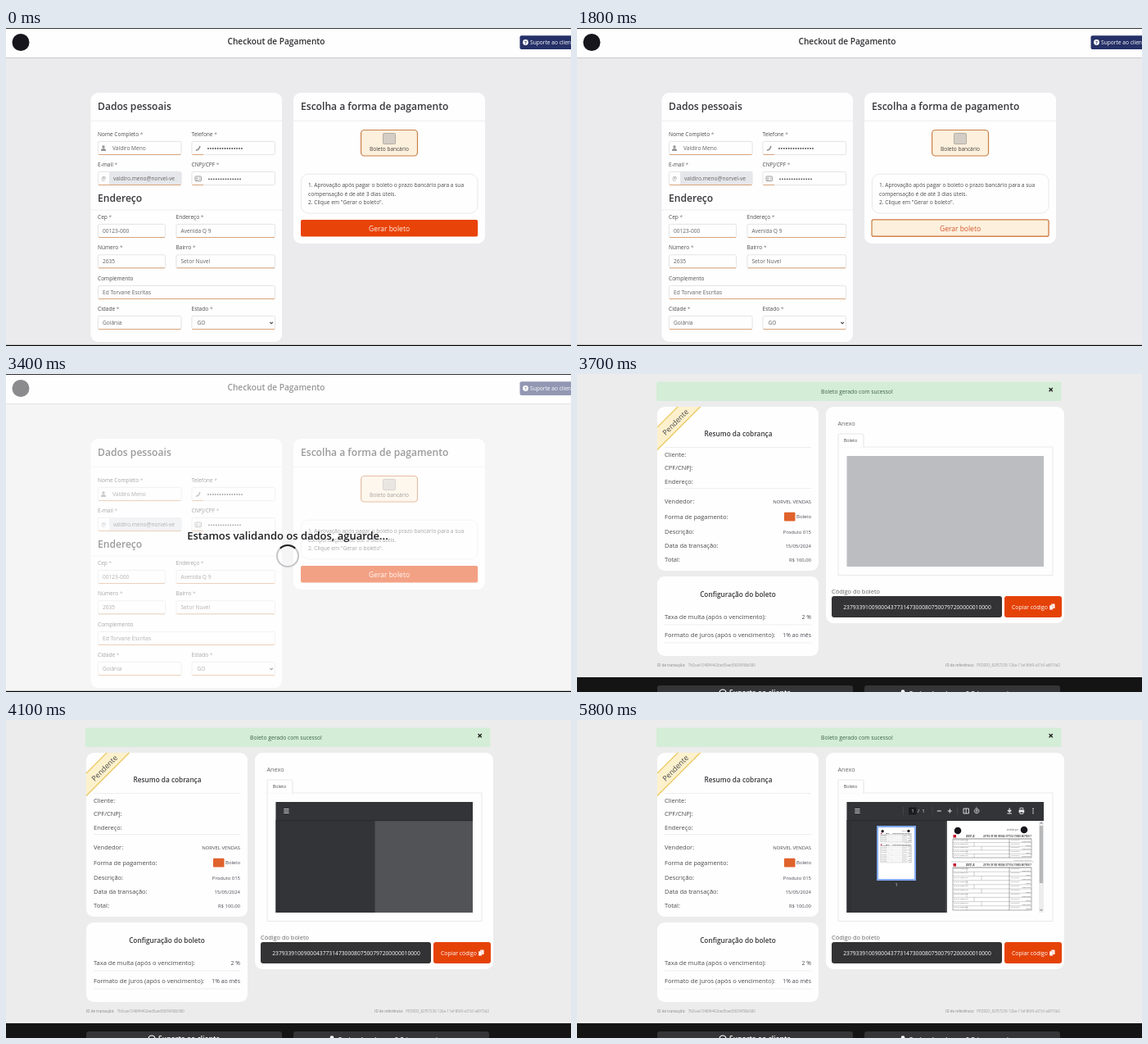
Recreate the animation shown at these times as an HTML page. Size 690x388 px, loop 6100 ms.

```html
<!DOCTYPE html>
<html lang="pt-BR">
<head>
<meta charset="utf-8">
<title>Checkout de Pagamento</title>
<style>
html, body { margin: 0; width: 100%; height: 100%; overflow: hidden; background: #ebebed; }
#stage { display: block; width: 100vw; height: 100vh; }
text { font-family: "Open Sans", "Noto Sans", sans-serif; white-space: pre; }
</style>
</head>
<body>
<svg id="stage" viewBox="0 0 690 388" preserveAspectRatio="none"></svg>
<script>
const LOOP = 6100;

// Drawing helpers return SVG markup
const rect = (x, y, x2, y2, fill, r = 0, more = '') =>
  `<rect x="${x}" y="${y}" width="${x2 - x}" height="${y2 - y}" rx="${r}" fill="${fill}" ${more}/>`;
const path = (d, color, width = 1, fill = 'none') =>
  `<path d="${d}" fill="${fill}" stroke="${color}" stroke-width="${width}"/>`;
const dot = (x, y, r, fill) => `<circle cx="${x}" cy="${y}" r="${r}" fill="${fill}"/>`;
const text = (x, y, s, size, fill = '#4b4b4f', anchor = 'start', weight = 400, more = '') =>
  `<text x="${x}" y="${y}" font-size="${size}" fill="${fill}" text-anchor="${anchor}" font-weight="${weight}" ${more}>${s}</text>`;
const rule = (x, y, x2, color = '#e9e9eb') => path(`M${x} ${y}H${x2}`, color, .8);
const group = (id, body) => `<g id="${id}">${body}</g>`;
const card = (x, y, x2, y2) => rect(x, y, x2, y2, '#fefefe', 9);
const heading = (x, y, s) => text(x, y, s, 12.1, '#37373c', 'start', 600);

function field(x, x2, y, label, value, inset = 6, lineEnd = x2 - 1) {
  const star = label === 'Complemento' ? '' : ' <tspan fill="#888">*</tspan>';
  return text(x, y - 6, label + star, 6.55) +
    rect(x + .4, y + .4, x2 - .4, y + 16.6, '#fefefe', 2, 'stroke="#dddde0" stroke-width=".8"') +
    (label === 'E-mail' ? rect(x + 14, y + .5, x2 - .5, y + 16.5, '#e6e7eb', 1) : '') +
    path(`M${x + 1} ${y + 16.5}H${lineEnd}`, '#d8a57c', 1) +
    text(x + inset, y + 11, value, 6.6, '#626267');
}

function secret(x, y, n) {
  let s = '';
  for (let i = 0; i < n; i++) s += dot(x + i * 2.92, y, .9, '#4a4a4a');
  return s;
}

function checkout() {
  const gray = '#949497';
  const icons =
    dot(119, 145, 1.7, gray) + path('M116 150v-1q0-2 3-2t3 2v1z', 'none', 0, gray) +
    path('M231.8 149.2q4.5-.6 5-5.4', gray, 1.6) +
    text(119.3, 186.2, '@', 6.6, gray, 'middle') +
    rect(231, 181, 238.4, 186.8, 'none', .8, `stroke="${gray}" stroke-width=".9"`) +
    dot(233.2, 183.4, .9, gray) + path('M232 185.6h2.5M235.4 183h2M235.4 185h2', gray, .7);

  return rect(0, 0, 690, 388, '#ebebed') +
    rect(0, 0, 690, 36, '#fefefe') + rect(0, 36, 690, 37, '#c8c8cc') +
    dot(18, 17.5, 10.5, '#16161c') +
    text(330, 20, 'Checkout de Pagamento', 10.15, '#2f2f33', 'middle', 600) +
    rect(627.5, 9.3, 700, 26, '#253067', 2) + dot(634.5, 17.5, 3.4, '#fff') +
    text(634.5, 19.7, '?', 6, '#253067', 'middle', 700) +
    text(640, 20, 'Suporte ao cliente', 6.63, '#fff') +
    card(103.5, 79, 337, 383) + card(351, 79, 585, 263) +
    heading(112, 100.3, 'Dados pessoais') + rule(104, 113.3, 337) +
    heading(112, 212.3, 'Endereço') + rule(104, 222, 337) +
    heading(360, 100.3, 'Escolha a forma de pagamento') + rule(351, 113.3, 585) +
    field(112, 214.5, 138, 'Nome Completo', 'Valdiro Meno', 18) +
    field(226.5, 329, 138, 'Telefone', '', 0, 241) + secret(247, 147, 15) +
    field(112, 214.5, 175, 'E-mail', 'valdiro.meno@norvel-ve', 19) +
    field(226.5, 329, 175, 'CNPJ/CPF', '', 0, 241) + secret(248, 184.3, 14) +
    field(112, 195, 239, 'Cep', '00123-000') +
    field(207.5, 329, 239, 'Endereço', 'Avenida Q 9') +
    field(112, 195, 276.3, 'Número', '2635') +
    field(207.5, 329, 276.3, 'Bairro', 'Setor Nuvel') +
    field(112, 329, 314, 'Complemento', 'Ed Torvane Escritas') +
    field(112, 214.5, 351, 'Cidade', 'Goiânia') +
    field(226.5, 329, 351, 'Estado', 'GO', 7) +
    path('M322.3 358.8l1.8 1.8 1.8-1.8', '#444', 1.1) + icons +
    rect(433.6, 124.5, 502.5, 156, '#fdf0dd', 4, 'stroke="#c98048" stroke-width="1.2"') +
    rect(460.5, 128.5, 475.5, 141.5, '#d3cdc5', 1, 'stroke="#a09a92" stroke-width=".7"') +
    text(468, 150, 'Boleto bancário', 6.5, '#45403c', 'middle') +
    rect(360.4, 178.2, 576, 226, '#fefefe', 9, 'stroke="#e4e4e6" stroke-width=".8"') +
    text(369, 194.3, '1. Aprovação após pagar o boleto o prazo bancário para a sua', 6.62) +
    text(369, 204.7, 'compensação é de até 3 dias úteis.', 6.62) +
    text(369, 215.2, '2. Clique em "Gerar o boleto".', 6.62) +
    rect(360, 234, 576.2, 254.5, '#e84308', 2) + text(468, 247.6, 'Gerar boleto', 8.5, '#fff3ea', 'middle') +
    group('hover',
      rect(360, 233.9, 576, 254.2, '#fdf0dd', 2, 'stroke="#cd7a42" stroke-width="1.2"') +
      text(468, 247.6, 'Gerar boleto', 8.5, '#d2552a', 'middle')) +
    group('wait',
      rect(0, 0, 690, 388, '#fff', 0, 'opacity=".5"') +
      text(344, 202, 'Estamos validando os dados, aguarde...', 12.97, '#1f1f23', 'middle', 600) +
      '<circle cx="344" cy="222" r="13" fill="none" stroke="#c6c6c9" stroke-width="2"/>' +
      group('arc', path('M334.8 212.8A13 13 0 0 1 353.2 212.8', '#222', 2))) +
    rect(0, 0, 690, .8, '#000') + rect(0, 386.8, 690, 388, '#000');
}

// One payment slip on the printed page
function slip(y, rows, step) {
  const end = y + 6 + rows * step;
  let s = rect(7.5, y + 1, 11, y + 4.5, '#c8102e') +
    text(23, y + 4.4, '237-2', 4, '#222', 'start', 700) +
    text(103, y + 4.4, '23793.39100 90004.377314 73000.807500 7', 2.9, '#222', 'end', 600) +
    path(`M7 ${y + 6}H103V${end}H7z M76 ${y + 6}V${end}`, '#555', .5);
  for (let i = 0; i < rows; i++) {
    const top = y + 6 + i * step;
    s += path(`M7 ${top}H103M${24 + i % 3 * 9} ${top}v${step}`, '#777', .35) +
      text(8, top + 2.2, 'Local de pagamento', 1.9, '#666') +
      text(78, top + 2.2, 'Vencimento', 1.9, '#666') +
      text(102, top + step - .7, i % 2 ? '100,00' : '15/05/2024', 2.1, '#333', 'end');
  }
  return s;
}

const sheet = () => rect(0, 0, 112, 160, '#fff') +
  dot(13, 12, 4.3, '#16161c') + dot(94, 11, 4.3, '#16161c') +
  text(87, 12, 'emitido por', 2.6, '#555', 'end') +
  slip(16, 5, 4.6) + text(103, 48.5, 'Autenticação mecânica', 2, '#666', 'end') +
  path('M5 50H106', '#888', .4) + slip(51, 10, 5.2);

function viewer() {
  const ink = '#e9e9ea';
  const tools = rect(405, 106.5, 414.5, 115.5, '#191b1c') +
    text(410, 113.2, '1', 6, ink, 'middle') + text(416, 113.2, '/  1', 6, ink) +
    path('M439.8 111h5M452.8 111h5M455.3 108.5v5', ink) +
    path('M398.5 106v10M434 106v10M464.5 106v10', '#4d5154', .6) +
    path('M472 108h6.4v6h-6.4zM475.2 108v6', ink, .9) +
    path('M486 109.2a2.8 2.8 0 1 0 2-1M488.4 106.5l-1.8 1.7 1.8 1.7M486.8 111l1.4-1.4 1.4 1.4-1.4 1.4z', ink, .8) +
    path('M528.2 107.5v4.5M526 110l2.2 2.2 2.2-2.2M525.5 114h5.4', ink, 1.2) +
    rect(539.6, 109.4, 546.2, 113, ink, .5) +
    path('M541 109v-1.7h3.8v1.7M541 112h3.8v2.5h-3.8z', ink, .8, '#323639') +
    dot(557, 108.4, .8, ink) + dot(557, 111, .8, ink) + dot(557, 113.6, .8, ink);
  return group('blank', rect(329.5, 100, 570, 235, '#bcbdc1')) +
    group('pdf',
      rect(329.5, 100, 570, 235, '#323438') + rect(450.5, 122.5, 570, 235, '#525357') +
      rect(329.5, 122, 570, 123.2, '#292b2e') + rect(329.5, 123, 335, 235, '#2e3034') +
      path('M339.3 108.7h6.2M339.3 111h6.2M339.3 113.3h6.2', ink, .9) +
      group('tools', tools) +
      group('page',
        `<svg x="452" y="123" width="112" height="112" viewBox="0 0 112 112">${sheet()}</svg>` +
        rect(564, 123, 570, 235, '#ededee') + rect(564.8, 129, 569.2, 199, '#b7b8ba') +
        path('M565.6 126.6l1.4-1.6 1.4 1.6M565.6 231l1.4 1.6 1.4-1.6', '#555', .8)) +
      group('thumb',
        rect(366, 129, 414, 196, '#83a9f2') +
        `<svg x="368" y="131" width="44" height="63" viewBox="0 0 112 160">${sheet()}</svg>` +
        text(390, 203.2, '1', 5.4, ink, 'middle')));
}

function receipt() {
  const rows = [
    ['Cliente:', 100.8], ['CPF/CNPJ:', 117.3], ['Endereço:', 134],
    ['Vendedor:', 158, 'NORVEL VENDAS'], ['Forma de pagamento:', 176.6, 'Boleto'],
    ['Descrição:', 195.2, 'Produto 015'], ['Data da transação:', 212, '15/05/2024'],
    ['Total:', 228.8, 'R$ 100,00'],
    ['Taxa de multa (após o vencimento):', 299.3, '2 %', 6.9],
    ['Formato de juros (após o vencimento):', 321.3, '1% ao mês', 6.9]
  ].map(([label, y, value = '', size = 5.95]) =>
    text(107, y, label, 7.52) + text(286, y - .3, value, size, '#4a4a54', 'end')).join('');

  return rect(0, 0, 690, 388, '#ececec') +
    rect(97, 9.5, 591.5, 33, '#d3edd7', 2) +
    text(342, 24, 'Boleto gerado com sucesso!', 6.74, '#3d5f48', 'middle') +
    path('M576.6 17l4.2 4.2M580.8 17l-4.2 4.2', '#222', 1.4) +
    card(98, 40, 295, 240) + card(98, 247, 295, 344) + card(304, 40, 595, 304) +
    path('M98 65L123 40H151L98 93z', 'none', 0, '#fdf1cd') +
    path('M98 65L123 40M98 92.5L150.5 40', '#ecc65e', 1.1) +
    text(0, 0, 'Pendente', 9, '#4a4a4a', 'middle', 400, 'transform="translate(122.5 61) rotate(-45)"') +
    text(197, 76.3, 'Resumo da cobrança', 8.25, '#38383c', 'middle', 600) +
    text(196.5, 272, 'Configuração do boleto', 8.25, '#38383c', 'middle', 600) +
    [89.5, 139.5, 306, 328].map(y => rule(107, y, 286)).join('') + rows +
    rect(253, 168.8, 266.5, 179.5, '#e0622c', 1) +
    text(318.5, 62.5, 'Anexo', 7.3, '#666') +
    rect(319, 89, 581, 245.5, 'none', 0, 'stroke="#e3e3e5" stroke-width=".8"') +
    path('M319 89.4V74.5q0-1.5 1.5-1.5H348.5q1.5 0 1.5 1.5V89.4', '#e0e0e2', .8, '#fefefe') +
    text(334, 82.8, 'Boleto', 5.4, '#4b4b4f', 'middle') + viewer() +
    text(311, 268, 'Código do boleto', 7.4, '#666') +
    rect(311, 271, 519, 297, '#333335', 3) + rect(522, 271, 592, 297, '#e54208', 3) +
    text(415.5, 286.7, '23793391009000437731473000807500797200000010000', 6.73, '#fff', 'middle') +
    text(531, 286.7, 'Copiar código', 6.85, '#fff') +
    rect(579, 280.5, 583.5, 286, '#fff', .6) +
    rect(577, 282, 581.2, 287.8, '#fff', .6, 'stroke="#e54208" stroke-width=".4"') +
    text(98, 356.8, '<tspan font-weight="600">ID de transação:</tspan>   7b0cae1048f4442bed5aed5839458b580', 4.4, '#9a9a9c') +
    text(590, 356.8, '<tspan font-weight="600">ID de referência:</tspan>   PEDIDO_82f57230-12ba-11ef-8fd9-a31b1ad915d2', 4.4, '#9a9a9c', 'end') +
    rect(0, 370, 690, 388, '#141415') +
    rect(98, 380, 337, 400, '#353537', 3) + rect(351, 380, 590, 400, '#353537', 3) +
    '<circle cx="178" cy="389" r="4" fill="none" stroke="#fff" stroke-width="1.2"/>' +
    text(186, 391.5, 'Suporte ao cliente', 8.6, '#fff', 'start', 600) +
    dot(398, 387.5, 2.3, '#fff') +
    text(405, 391.5, 'Gestor de cobrança? Crie sua conta', 7.5, '#fff', 'start', 600);
}

const stage = document.getElementById('stage');
stage.innerHTML = group('checkout', checkout()) + group('receipt', receipt());
const el = {};
stage.querySelectorAll('g[id]').forEach(g => el[g.id] = g);

const ramp = (t, from, to) => Math.min(1, Math.max(0, (t - from) / (to - from)));
const show = (id, on) => el[id].style.display = on ? '' : 'none';

function draw(now) {
  const t = Math.floor(now % LOOP / 100) * 100;
  show('checkout', t < 3600);
  show('receipt', t >= 3600);
  el.hover.style.opacity = ramp(t, 350, 500) - ramp(t, 1150, 1300) +
    ramp(t, 1650, 1800) - ramp(t, 2650, 2800);
  el.wait.style.opacity = ramp(t, 2600, 2800);
  el.arc.setAttribute('transform', `rotate(${(t - 3400) * .36} 344 222)`);
  show('blank', t >= 3700);
  show('pdf', t >= 4000);
  show('tools', t >= 4200);
  show('page', t >= 4400);
  show('thumb', t >= 4600);
}

const start = performance.now();
function tick() {
  draw(performance.now() - start);
  requestAnimationFrame(tick);
}
tick();
</script>
</body>
</html>
```
